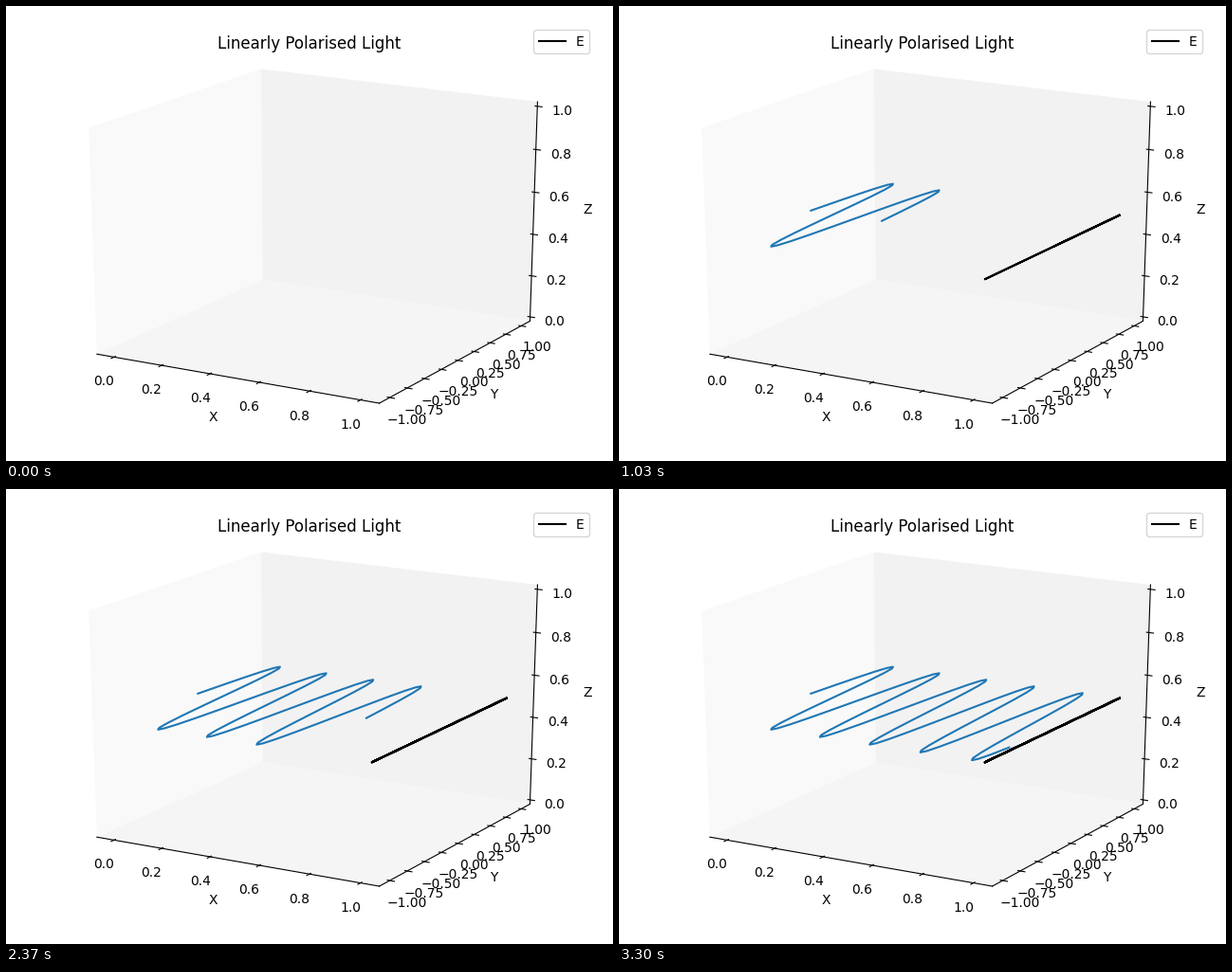
A matplotlib script that plays this animation: 640 by 480 pixels, repeating every 3330 ms.

```python
import numpy as np
import matplotlib.pyplot as plt
from matplotlib.animation import FuncAnimation
from matplotlib.collections import LineCollection

STEPS, LOOP_MS, TICK_MS = 100, 3330, 10
TICKS = LOOP_MS // TICK_MS
ELEV, AZIM, DIST = np.radians(20), np.radians(-60), 10
H = 25 / 48        # half edge of the drawn box around a unit cube
DELTA = 1 / 12     # length unit for ticks and label offsets


def project(points):
    """Perspective view of points in the centred unit cube."""
    x, y, z = np.moveaxis(np.asarray(points, float), -1, 0)
    across = -np.sin(AZIM) * x + np.cos(AZIM) * y
    toward = np.cos(AZIM) * x + np.sin(AZIM) * y
    up = np.cos(ELEV) * z - np.sin(ELEV) * toward
    depth = DIST - (np.cos(ELEV) * toward + np.sin(ELEV) * z)
    return across / depth, up / depth


def to_cube(x, y, z):
    """Data values to cube coordinates: x in 0..1, y in -1..1, z in 0..1."""
    x, y, z = np.broadcast_arrays(x, y, z)
    return np.stack([(x - 0.5) / 1.1, y / 2.2, z - 0.5], axis=-1)


plt.rcParams["font.family"] = "DejaVu Sans"
fig = plt.figure(figsize=(6.4, 4.8), dpi=100, facecolor="white")
ax = fig.add_axes([18 / 640, 17.9 / 480, 604 / 640, 444 / 480])
ax.set_xlim(-0.095, 0.09)
ax.set_ylim(-0.095, 0.09)
ax.axis("off")
ax.set_title("Linearly Polarised Light", fontsize=12, y=0.92)

points_across = 72 * (6.04 + 4.44)
per_point = 48 / points_across * DELTA
TICK_GAP, NAME_GAP = 11.5 * per_point, 25 * per_point


def pane(axis, side, grey):
    corners = np.empty((4, 3))
    others = [i for i in range(3) if i != axis]
    corners[:, axis] = side
    corners[:, others] = H * np.array([(-1, -1), (1, -1), (1, 1), (-1, 1)])
    ax.fill(*project(corners), color=str(grey), lw=0, zorder=0)


def axis_line(axis, edge, tick_dir, values, fmt, name):
    edge = np.array(edge, float)
    away = np.sign(edge)
    ends = np.array([edge, edge])
    ends[:, axis] = -H, H
    strokes = [np.transpose(project(ends))]

    px, py = project(edge + away * NAME_GAP)
    ax.text(px, py, name, ha="center", va="center", fontsize=10)

    for value in values:
        data = [0, 0, 0]
        data[axis] = value
        spot = edge.copy()
        spot[axis] = to_cube(*data)[axis]
        tick = np.array([spot, spot])
        tick[:, tick_dir] += away[tick_dir] * DELTA * np.array([-0.1, 0.2])
        strokes.append(np.transpose(project(tick)))
        px, py = project(spot + away * TICK_GAP)
        label = format(value, fmt).replace("-", "\u2212")
        ax.text(px, py, label, ha="center", va="top", fontsize=10)

    ax.add_collection(LineCollection(strokes, colors="k", linewidths=0.8,
                                     capstyle="projecting", zorder=1),
                      autolim=False)


pane(0, -H, 0.975)
pane(1, H, 0.95)
pane(2, -H, 0.9625)
fifths = np.arange(6) / 5
axis_line(0, (0, -H, -H), 1, fifths, ".1f", "X")
axis_line(1, (H, 0, -H), 0, np.arange(-4, 5) / 4, ".2f", "Y")
axis_line(2, (H, H, 0), 0, fifths, ".1f", "Z")

# A wave with five periods along x, and its trace on the plane x = 1
x = np.arange(STEPS) / STEPS
field = np.sin(2 * np.pi * 5 * x)
wave_xy = project(to_cube(x, field, 0.5))
trace_xy = project(to_cube(1.0, field, 0.5))

wave, = ax.plot([], [], color="tab:blue", lw=1.5, zorder=2)
trace, = ax.plot([], [], color="k", lw=1.5, zorder=2.1, label="E")
ax.legend(loc="upper right", fontsize=10)


def draw(tick):
    # Steps last a thirtieth of a second, rounded to whole ticks
    step = int((tick + 0.5) * TICK_MS * 30 / 1000)
    for line, (px, py) in ((wave, wave_xy), (trace, trace_xy)):
        line.set_data(px[:step], py[:step])
    return wave, trace


anim = FuncAnimation(fig, draw, frames=TICKS, init_func=lambda: draw(0),
                     interval=TICK_MS, repeat=True, repeat_delay=0)
plt.show()
```
